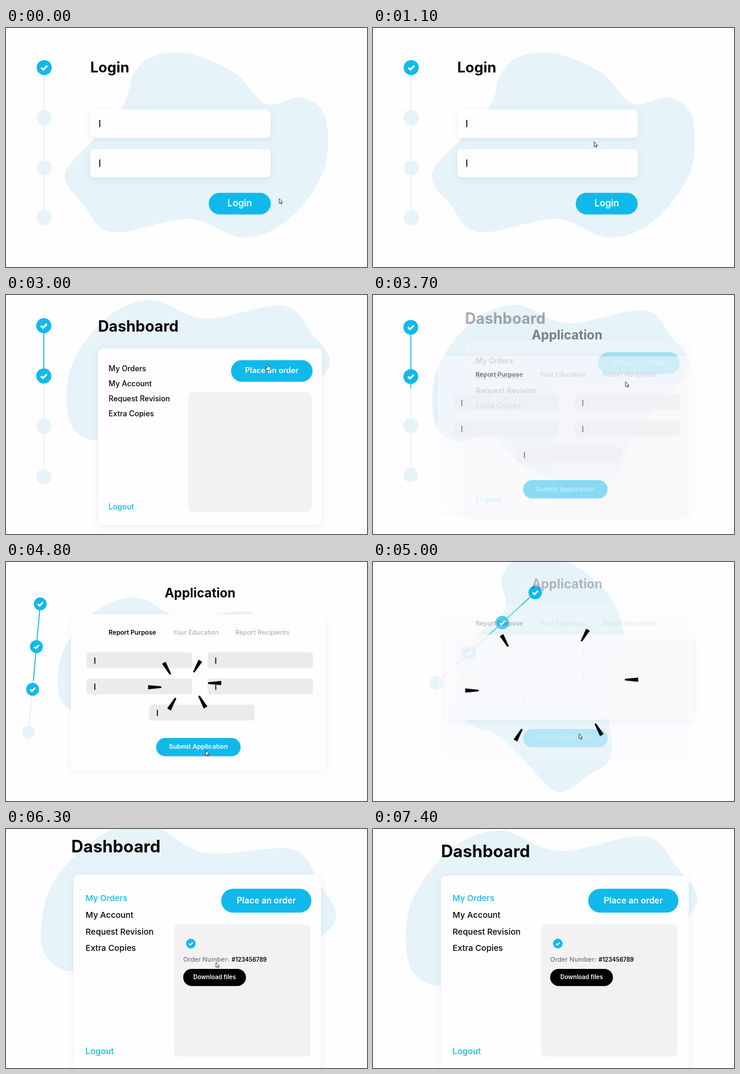
Animation of 600x398 px, one loop 8.1 s. Source, as an HTML page with a canvas:

```html
<!DOCTYPE html>
<html lang="en">
<head>
<meta charset="utf-8">
<title>Order flow</title>
<style>
  html, body { margin: 0; width: 100%; height: 100%; overflow: hidden; background: #fefdff; }
  canvas { display: block; width: 600px; height: 398px; }
</style>
</head>
<body>
<canvas id="stage" width="600" height="398"></canvas>
<script>
const ctx = document.getElementById('stage').getContext('2d');
const LOOP = 8100, STEP = 100, RAD = Math.PI / 180;
const BG = '#fefdff', CYAN = '#11b9eb', PALE = '#e6f3f9', INK = '#050505';
const PANEL = '#f3f1f4', FIELD = '#ebeaec', MUTED = '#b3b2b5';

const clamp = v => Math.max(0, Math.min(1, v));
const ramp = (t, a, b) => clamp((t - a) / (b - a));
const ease = p => p < .5 ? 4 * p ** 3 : 1 - (2 - 2 * p) ** 3 / 2;
const easeOut = p => 1 - (1 - p) ** 3;
const mix = (a, b, p) => a.map((v, i) => v + (b[i] - v) * p);

// Each move eases from the pose before it: { from, to, pose }
const follow = (start, moves, t) =>
  moves.reduce((pose, m) => mix(pose, m.pose, ease(ramp(t, m.from, m.to))), start);

// One outline around its own centre; it only turns, scales and moves
const outline = [[-220, 48], [-171, -11], [-122, -68], [-106, -118], [-73, -148], [-13, -152],
  [62, -120], [114, -69], [174, -79], [213, -45], [209, 45], [150, 125],
  [75, 154], [-13, 123], [-141, 145], [-188, 101]];

// x, y, scale, angle
const blobStart = [318, 195, 1, 0];
const blobMoves = [
  { from: 2100, to: 3000, pose: [318, 162.5, 1, 180] },
  { from: 3400, to: 4300, pose: [272, 196, .853, 180] },
  { from: 4300, to: 4800, pose: [272, 196, .853, 185] },
  { from: 4800, to: 5200, pose: [278.5, 174, .925, 361.6] },
  { from: 5850, to: 6300, pose: [299, 173, 1.107, 547.4] },
  { from: 6300, to: 6700, pose: [295, 173, 1.107, 540] }
];

// x, y, angle, spacing
const stepStart = [63.5, 191, 90, 83.4];
const stepMoves = [
  { from: 2100, to: 3000, pose: [62.8, 176.7, 90, 83.7] },
  { from: 3400, to: 4300, pose: [62.8, 176.5, 90, 72] },
  { from: 4300, to: 4800, pose: [47.4, 176.5, 95.1, 71.4] },
  { from: 4800, to: 5200, pose: [327.4, 75.5, 180, 77.2] }
];

// x, y; sway swings the pointer to both sides on its way
const pointerStart = [454, 284];
const pointerMoves = [
  { from: 0, to: 400, pose: [343, 312], sway: 30 },
  { from: 700, to: 1500, pose: [392, 297], sway: 230 },
  { from: 2100, to: 3000, pose: [435, 115] },
  { from: 3400, to: 4300, pose: [332, 314] },
  { from: 4800, to: 5200, pose: [353, 258] },
  { from: 5200, to: 5500, pose: [349, 222] },
  { from: 6700, to: 7400, pose: [516, 358] }
];

function text(s, x, y, size, weight = 500, color = INK, align = 'left') {
  ctx.font = `${weight} ${size}px Inter, "Open Sans", sans-serif`;
  ctx.textAlign = align;
  ctx.fillStyle = color;
  ctx.fillText(s, x, y);
}

function box(x, y, w, h, r, color) {
  ctx.beginPath();
  ctx.roundRect(x, y, w, h, r);
  ctx.fillStyle = color;
  ctx.fill();
}

function card(x, y, w, h, r, strength = .1) {
  ctx.save();
  ctx.shadowColor = `rgba(50,105,140,${strength})`;
  ctx.shadowBlur = 12;
  ctx.shadowOffsetY = 3;
  box(x, y, w, h, r, BG);
  ctx.restore();
}

function button(label, x, y, w, h, size, color = CYAN) {
  box(x, y, w, h, h / 2, color);
  text(label, x + w / 2, y + h / 2 + size * .3, size, 600, '#fff', 'center');
}

const caret = (x, y, h) => box(x, y, 1.6, h, 0, INK);

function dot(x, y, r, color) {
  ctx.beginPath();
  ctx.arc(x, y, r, 0, 7);
  ctx.fillStyle = color;
  ctx.fill();
}

function line(points, width, color) {
  ctx.beginPath();
  points.forEach(p => ctx.lineTo(...p));
  ctx.lineWidth = width;
  ctx.strokeStyle = color;
  ctx.stroke();
}

function check(x, y, r) {
  dot(x, y, r, CYAN);
  line([[x - .38 * r, y + .02 * r], [x - .1 * r, y + .28 * r], [x + .4 * r, y - .24 * r]], .25 * r, '#fff');
}

function blob(t) {
  const [x, y, scale, angle] = follow(blobStart, blobMoves, t);
  const n = outline.length, at = i => outline[(i + n) % n];
  ctx.save();
  ctx.translate(x, y);
  ctx.rotate(angle * RAD);
  ctx.scale(scale, scale);
  ctx.beginPath();
  ctx.moveTo(...at(0));
  for (let i = 0; i < n; i++) {
    const [a, b, c, d] = [at(i - 1), at(i), at(i + 1), at(i + 2)];
    ctx.bezierCurveTo(b[0] + (c[0] - a[0]) / 6, b[1] + (c[1] - a[1]) / 6,
      c[0] - (d[0] - b[0]) / 6, c[1] - (d[1] - b[1]) / 6, ...c);
  }
  ctx.fillStyle = PALE;
  ctx.fill();
  ctx.restore();
}

function stepper(t) {
  const [x, y, angle, gap] = follow(stepStart, stepMoves, t);
  const done = ramp(t, 2200, 2900) + .8 * ramp(t, 3500, 4200) + 1.2 * ramp(t, 4800, 5200);
  const r = gap * .15;
  const at = i => [x + Math.cos(angle * RAD) * gap * (i - 1.5), y + Math.sin(angle * RAD) * gap * (i - 1.5)];
  line([at(0), at(3)], 1.7, PALE);
  line([at(0), at(done)], 1.6, CYAN);
  for (let i = 0; i < 4; i++) {
    dot(...at(i), r, PALE);
    faded(clamp((done - i + .5) * 4), 0, () => check(...at(i), r));
  }
}

function login() {
  text('Login', 140, 74, 24, 700);
  for (const y of [135.5, 201.5]) {
    card(140, y, 300, 47.5, 7);
    caret(155, y + 17.5, 12);
  }
  button('Login', 337, 274.5, 103, 36, 15.3);
}

function dashboard(first = INK, shift = 0) {
  card(153 - shift, 89 - 2 * shift, 372, 294 + 2 * shift, 8);
  text('Dashboard', 153 - 4 * shift, 61 - 7 * shift, 25.1, 700);
  ['My Orders', 'My Account', 'Request Revision', 'Extra Copies']
    .forEach((s, i) => text(s, 170.5, 127 + i * 25.1, 12.45, 500, i ? INK : first));
  text('Logout', 170.3, 357, 12.8, 500, CYAN);
  button('Place an order', 374, 108.5, 135.5, 36, 12.8);
  box(303, 162, 205, 199, 7, PANEL);
}

// The dashboard again, closer and with an order in its panel
function orders(t) {
  ctx.translate(-56.4, -20.6);
  ctx.scale(1.107, 1.107);
  dashboard(CYAN, 1 - ease(ramp(t, 6300, 6700)));
  check(328.5, 191, 7.2);
  text('Order Number:', 317, 218.6, 9.7, 500, '#77767c');
  text('#123456789', 389.7, 218.6, 8.7, 600);
  button('Download files', 317, 229, 94.2, 25.8, 8.95, '#000');
}

function form() {
  card(108, 87, 423, 260, 0, .06);
  text('Application', 322.5, 59, 21, 700, INK, 'center');
  text('Report Purpose', 170.5, 121, 10.5, 600);
  text('Your Education', 277, 121, 10.6, 500, MUTED);
  text('Report Recipients', 381, 121, 10.7, 500, MUTED);
  for (let i = 0; i < 5; i++) {
    const x = i < 4 ? 134 + 201 * (i % 2) : 238, y = 150.5 + 43.5 * (i >> 1);
    box(x, y, 175, 26.5, 4, FIELD);
    caret(x + 12.8, y + 8.5, 10.5);
  }
  button('Submit Application', 249.5, 293, 140.5, 30.5, 10.7);
}

const doneCard = () => card(121, 115, 411, 142, 7);

// Six wedges fly outward on an ellipse
function burst(t) {
  if (t < 4500 || t > 5100) return;
  const k = .35 + .65 * ramp(t, 4500, 4800) + 2.5 * ramp(t, 4800, 5100);
  ctx.fillStyle = INK;
  for (let i = 0; i < 6; i++) {
    const a = i * 60 * RAD;
    ctx.save();
    ctx.translate(297 + 50 * k * Math.cos(a - .1), 205 + 34 * k * Math.sin(a - .1));
    ctx.rotate(a);
    ctx.beginPath();
    ctx.moveTo(-11, -1.4);
    ctx.lineTo(11, -3.5);
    ctx.lineTo(11, 3.5);
    ctx.lineTo(-11, 1.4);
    ctx.fill();
    ctx.restore();
  }
}

const arrow = new Path2D('M0 0V8.4L2 6.6L3.4 9.5L4.6 8.9L3.3 6.1H5.8Z');
const hand = new Path2D('M-1 .5Q0 -.8 1 .5V4L4 5Q4.6 5.2 4.5 6.5L3.6 10.5H-1.6L-4 6.8Q-3.4 5.4 -1 7Z');

function pointer(t) {
  if (t >= 7400) return;
  let [x, y] = follow(pointerStart, pointerMoves, t);
  for (const { from, to, sway = 0 } of pointerMoves) {
    const p = ramp(t, from, to);
    x += sway * Math.sin(2 * Math.PI * p);
    y -= sway * .5 * Math.sin(Math.PI * p);
  }
  const shape = t >= 3000 && t < 3500 ? hand : arrow;
  ctx.save();
  ctx.translate(x, y);
  ctx.fillStyle = '#fff';
  ctx.strokeStyle = '#333';
  ctx.lineWidth = .9;
  ctx.fill(shape);
  ctx.stroke(shape);
  ctx.restore();
}

const scenes = [
  { draw: login, enter: [-2, -1], leave: [2200, 2500] },
  { draw: () => dashboard(), enter: [2300, 2800], leave: [3500, 3800] },
  { draw: form, enter: [3600, 4100], leave: [4850, 5050] },
  { draw: doneCard, enter: [4850, 5200], leave: [5900, 6150] },
  { draw: orders, enter: [5950, 6300], leave: [LOOP, LOOP + 1] }
];

function faded(alpha, dy, draw, t) {
  if (alpha <= 0) return;
  ctx.save();
  ctx.globalAlpha *= alpha;
  ctx.translate(0, dy);
  draw(t);
  ctx.restore();
}

function render(t) {
  ctx.fillStyle = BG;
  ctx.fillRect(0, 0, 600, 398);
  blob(t);
  faded(1 - ramp(t, 5900, 6200), 0, stepper, t);
  for (const { draw, enter, leave } of scenes) {
    const shown = easeOut(ramp(t, ...enter)), gone = ramp(t, ...leave);
    faded(shown * (1 - gone), 30 * (1 - shown) - 20 * gone, draw, t);
  }
  burst(t);
  pointer(t);
}

const start = performance.now();
function tick() {
  const t = (performance.now() - start) % LOOP;
  render(Math.floor(t / STEP) * STEP);
  requestAnimationFrame(tick);
}
tick();
</script>
</body>
</html>
```
